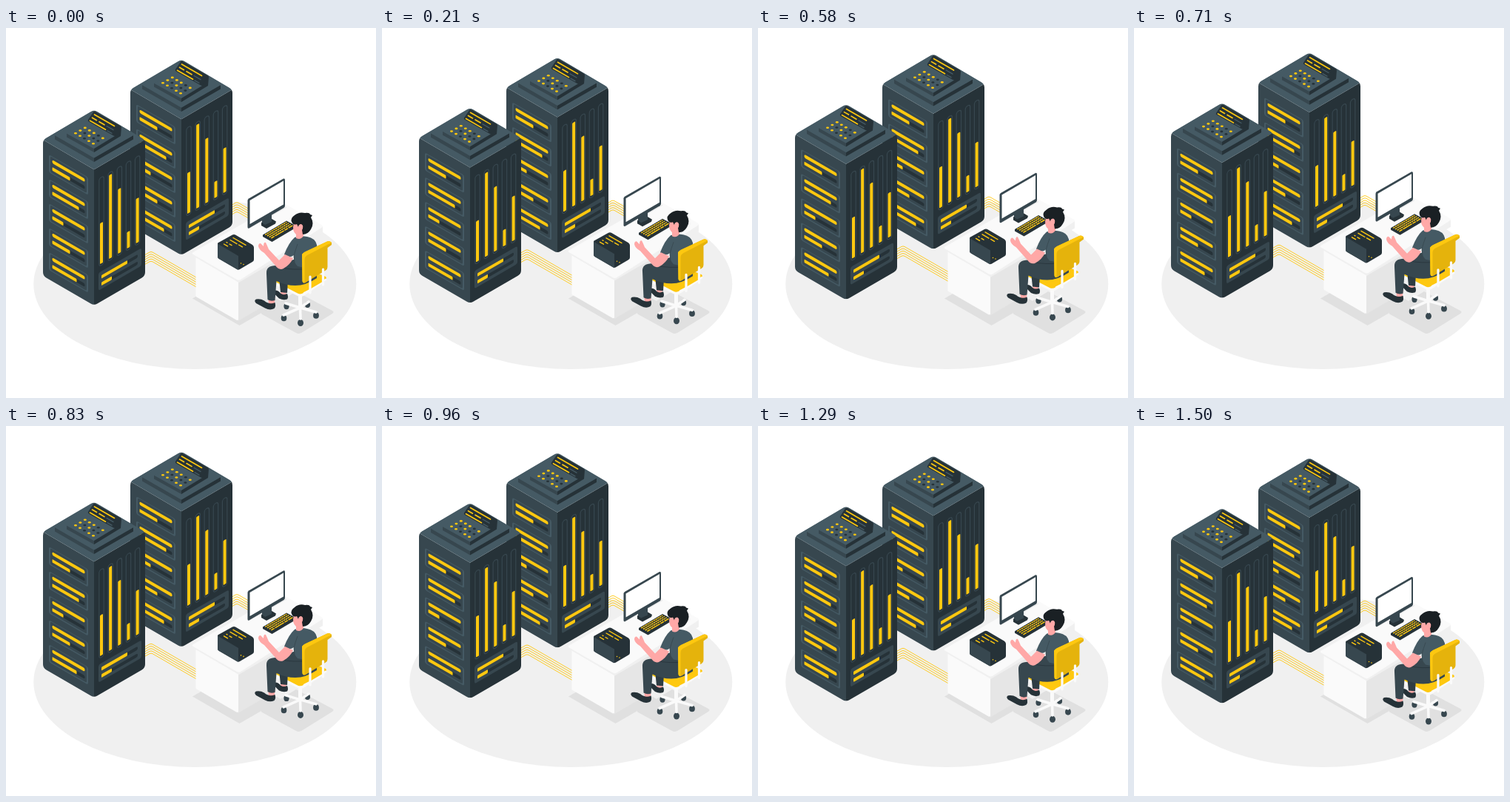
An HTML page for the animation above (1.54 s loop, 500 px wide and 500 px high).

```html
<!DOCTYPE html>
<html lang="en">
<head>
<meta charset="utf-8">
<title>Server room</title>
<style>
  html, body { margin: 0; width: 100%; height: 100%; overflow: hidden; background: #fff; }
  svg { display: block; width: 100%; height: 100%; }
</style>
</head>
<body>
<svg viewBox="0 0 500 500">
  <defs>
    <clipPath id="hull"><path id="hullPath"/></clipPath>
    <g id="tower"></g>
  </defs>

  <ellipse cx="255.3" cy="346" rx="218" ry="115" fill="#f0f0f0"/>
  <g fill="#e0e0e0">
    <path d="M252 365.500L315.500 402L372 369.500L308 333Z"/>
    <path d="M345 384.500Q344 386 347 387.500L392 412Q396 414 400 411.500L441 386Q444 384 441 382L392 356Z"/>
  </g>

  <g id="scene">
    <g id="wires" fill="none" stroke="#fec810" stroke-width=".9"></g>
    <use href="#tower" x="118" y="-68"/>
    <use href="#tower"/>

    <g id="desk">
      <path d="M313.500 342L365 312V366L313.500 396Z" fill="#e6e6e6"/>
      <path d="M256.500 308L314 341V394.500L312 395L257.500 363.500Q256.500 363 256.500 362Z" fill="#fafafa"/>
      <path d="M252 304V307.500L314.500 344L428 278V268Z" fill="#f0f0f0"/>
      <path d="M253 303L369 236Q371.500 235 374 236L427 266.500Q429 268 427 269.500L317 340Q314.500 341.500 312 340L253 306Q250.500 304.500 253 303Z" fill="#fafafa"/>
      <path d="M328 271L379 242" stroke="#e6e6e6" stroke-width="1"/>
    </g>

    <g id="monitor">
      <path d="M345 263L356 256L365 261.500L364 264.500L352 271L345 267Z" fill="#263238"/>
      <path d="M346 257L359 250V262L350 266L346 263Z" fill="#37474f"/>
      <path d="M328 230.500L375 203.500Q377 203 377 205V240Q377 242 375.500 243L328.500 270.500Q326.500 271.500 326.500 269V233Q326.500 231.500 328 230.500Z" fill="#37474f"/>
      <path d="M329.500 233L375 206.500V238.500L329.500 265Z" fill="#fff"/>
    </g>

    <g id="keyboard">
      <path d="M347 279.500L379 260.500L391.500 267V270L359.500 289L347 282Z" fill="#263238"/>
    </g>

    <g id="box">
      <path d="M286 291.500Q286 290 288 289.500L306 279.500Q308 278.500 310 279.500L333 293Q335 294.500 335 296.500V313Q335 315 333 316L316 326Q314 327 312 326L288 312Q286 311 286 309Z" fill="#263238"/>
      <path d="M286 291.500L314 308V327L288 312Q286 311 286 309Z" fill="#37474f"/>
      <g fill="#fec810"><circle cx="317.500" cy="318" r=".8"/><circle cx="321" cy="319.500" r=".8"/></g>
    </g>

    <g id="chairBase">
      <g fill="#37474f">
        <ellipse cx="379" cy="376" rx="3.600" ry="4.200"/>
        <ellipse cx="407.500" cy="374" rx="3.600" ry="4"/>
        <ellipse cx="375.500" cy="392" rx="3.800" ry="4.300"/>
        <ellipse cx="398" cy="398.500" rx="4" ry="4.500"/>
        <ellipse cx="419" cy="388.500" rx="3.900" ry="4.300"/>
      </g>
      <g fill="none" stroke="#fafafa" stroke-width="3.600" stroke-linecap="round" stroke-linejoin="round">
        <path d="M397.500 378L378 372M397.500 378L409 370M397.500 378L375 388M397.500 378L398 393M397.500 378L419 384"/>
        <path d="M397.500 360V378" stroke-width="5"/>
      </g>
      <path d="M362 339.500V344Q362 346 364 347L394 362Q398 364 402 362L428 345V339Z" fill="#fafafa"/>
      <path d="M363 339Q364 336 367 335L398 322L432 336Q434 338 431 341L402 358Q398 360.500 394 358.500L366 344Q362 342 363 339Z" fill="#fec810"/>
    </g>

    <g id="person">
      <g fill="#ffa8a7">
        <path d="M371.500 350L379.500 352L378.500 361L371 360Z"/>
        <path d="M354 362L363.500 363L363 373L355 373Z"/>
      </g>
      <g fill="#263238" transform="translate(0 .5)">
        <path d="M364 354Q368 354 371 358Q375 361 380 358.500Q382 363 380 366Q375 368 369 365L364 360Q362 356 364 354Z"/>
        <path d="M338 366Q344 365 349 368Q356 374 363.500 370.500Q365 376 362.500 378.500Q357 381.500 350 378L338 371.500Q334.500 368 338 366Z"/>
      </g>
      <path d="M369 338L381 341L380 358L371 357Z" fill="#2e3c43"/>
      <path d="M392 312Q377 316 365 321Q351 321 352 332L353.500 367Q358 370 363.500 368L365.500 342Q378 348 391 348Q405 348 420 338V314Z" fill="#37474f"/>
      <path d="M365 321Q375 327 401 326" fill="none" stroke="#263238" stroke-width=".7"/>
      <path d="M390 283Q397 280 407 282Q418 284 420 293L421.500 318Q409 326 394 322Q388 316 389 307Q382 312 376 306Q382 290 390 283Z" fill="#455a64"/>
      <path d="M394 292Q391 300 389 308L390 316" fill="none" stroke="#37474f" stroke-width=".8"/>
      <path d="M377 306L388 311Q384 320 375 325Q369 328 364 321L349 304Q342 300 341 295Q341 291 344 291L348 295Q348 289 351 290Q353 294 355 299L369 314Z" fill="#ffa8a7"/>
      <path d="M389 264Q386 274 392 279L392 284Q398 287 402 281L402 265Z" fill="#ffa8a7"/>
      <path d="M386 262Q384 257 390 253Q396 248 404 250Q410 249 411 252L414 253L412 256Q417 264 412 272Q408 279 401 279L400 273Q403 267 399 265Q396 265 395 269L393 265Q388 267 386 262Z" fill="#1a2024"/>
      <ellipse cx="398" cy="269.500" rx="2.800" ry="4" fill="#ffa8a7"/>
    </g>

    <g id="chairBack">
      <path d="M400 306Q401 304 404 302.500L434 288.500Q437 287 440 290V293L434.500 297V323Q434.500 326 432 327.500L405 344Q401 346 400.500 342Z" fill="#e5b30c"/>
      <path d="M400 306Q401 304 404 302.500L434 288.500Q437 287 440 290L407 307Q403.500 309 403.500 313V344Q401 345 400.500 342Z" fill="#fec810"/>
      <g fill="none" stroke="#fafafa" stroke-width="3.200" stroke-linecap="round">
        <path d="M411 336V358M428.500 326V347"/>
        <path d="M411 354L403 358M428.500 342L432 340" stroke-width="2.500"/>
      </g>
    </g>
  </g>
</svg>
<script>
const NS = 'http://www.w3.org/2000/svg';
const $ = id => document.getElementById(id);
const SLOPE = 0.577;
const INK = '#263238', SLATE = '#37474f', STEEL = '#455a64', GOLD = '#fec810';

function add(parent, tag, attrs) {
  const el = document.createElementNS(NS, tag);
  for (const k in attrs) el.setAttribute(k, attrs[k]);
  return parent.appendChild(el);
}
const poly = (g, points, fill) => add(g, 'polygon', { points, fill });
const bar = (g, x, y, width, height, fill, rx = 0) => add(g, 'rect', { x, y, width, height, fill, rx });
const line = (g, x, y, len, stroke, w) =>
  add(g, 'path', { d: `M${x} ${y}l${len} ${len * SLOPE}`, stroke, 'stroke-width': w, 'stroke-linecap': 'round' });

// Closed path with softened corners.
function softPath(pts, r) {
  const toward = (a, b) => {
    const k = r / Math.hypot(b[0] - a[0], b[1] - a[1]);
    return [a[0] + (b[0] - a[0]) * k, a[1] + (b[1] - a[1]) * k];
  };
  return pts.map((p, i) => {
    const from = toward(p, pts.at(i - 1)), to = toward(p, pts[(i + 1) % pts.length]);
    return `${i ? 'L' : 'M'}${from}Q${p} ${to}`;
  }).join('') + 'Z';
}

function drawBody(g) {
  const body = add(g, 'g', { 'clip-path': 'url(#hull)' });
  poly(body, '50,151 119,191.300 119,376 50,336', SLATE);
  poly(body, '188,151 119,191.300 119,376 188,336', INK);
  poly(body, '119,110 188,151 119,191.300 50,151', STEEL);
}

function drawLeftFace(g) {
  const face = add(g, 'g', { transform: `matrix(1 ${SLOPE} 0 1 50 152)` });
  [24, 36, 15, 24, 33].forEach((len, i) => {
    const y = 14.5 + 33 * i;
    bar(face, 8, y, 53, 24, STEEL, 2.5);
    bar(face, 10, y + 1, 49, 21.5, SLATE, 2);
    bar(face, 12.5, y + 4.5, 44, 4.6, GOLD, 2);
    bar(face, 12.5, y + 14.3, 44, 4.6, INK, 2);
    bar(face, 12.5, y + 14.3, len, 4.6, GOLD, 1);
  });
}

function drawRightFace(g) {
  const face = add(g, 'g', { transform: `matrix(1 ${-SLOPE} 0 1 119 191.8)` });
  [77, 19, 45, 110, 72].forEach((top, i) => {
    const x = 10 + 12.15 * i;
    add(face, 'rect', { x: x - 3.2, y: 15.5, width: 6.4, height: 119, rx: 3, fill: INK, stroke: SLATE, 'stroke-width': 1.2 });
    bar(face, x - 2, top, 4, 132 - top, GOLD, 1);
  });
  bar(face, 6, 142.5, 58, 24, SLATE, 2.5);
  [[148, 35], [157.5, 14]].forEach(([y, len]) => {
    bar(face, 10, y, 49, 4.6, INK, 2);
    bar(face, 10, y, len, 4.6, GOLD, 1);
  });
}

function drawConsole(g) {
  poly(g, '66,145 119,175.500 119,181 66,150.500', SLATE);
  poly(g, '172,145 119,175.500 119,181 172,150.500', INK);
  poly(g, '66,145 119,114.500 172,145 119,175.500', STEEL);

  poly(g, '82,142.500 119,163 119,168 82,147.500', SLATE);
  poly(g, '119,162 146,146 154,131.500 156,134 155,146 119,168', INK);
  poly(g, '82,142.500 111,125 147,146 119,163', STEEL);
  add(g, 'path', { d: softPath([[119, 112], [155, 132.5], [147, 146.5], [110, 125.5]], 2), fill: INK });
  line(g, 119.5, 117, 27, GOLD, 1.7);
  line(g, 116.5, 121.2, 6, GOLD, 1.7);
  line(g, 126, 126.7, 7, GOLD, 1.7);
  line(g, 136, 132.5, 9, STEEL, 1.4);
  line(g, 113.5, 125.2, 21, GOLD, 1.7);
  line(g, 137, 138.8, 6, STEEL, 1.4);

  const lit = '111101011100101';
  for (let i = 0; i < 15; i++) {
    const a = Math.floor(i / 3), b = i % 3;
    add(g, 'ellipse', {
      cx: 94 + 6 * a + 6.4 * b, cy: 142.3 + 3.5 * a - 3.7 * b,
      rx: 2, ry: 1.3, fill: +lit[i] ? GOLD : INK
    });
  }
}

function drawWires(g) {
  for (let k = 0; k < 5; k++) {
    const y = 3.2 * k;
    add(g, 'path', { d: `M186 ${307.500 + y}L194 ${303 + y}q2 -1 4 0l62 35.800` });
    add(g, 'path', { d: `M304 ${240 + y}L310 ${236.300 + y}q2 -1 4 0l20 11.500` });
  }
}

function drawKeys(g) {
  for (let r = 0; r < 4; r++) {
    add(g, 'path', {
      d: `M${350.3 + 2.7 * r} ${279.5 + 1.5 * r}l29 -17.200`, stroke: GOLD,
      'stroke-width': 1.5, 'stroke-dasharray': r === 3 ? '5 1 14 1' : '2.5 .7', fill: 'none'
    });
  }
}

$('hullPath').setAttribute('d', softPath([[119, 110.5], [188, 151], [188, 335], [119, 375], [50, 335], [50, 151]], 5));
[drawBody, drawLeftFace, drawRightFace, drawConsole].forEach(draw => draw($('tower')));
drawWires($('wires'));
drawKeys($('keyboard'));
[[307, 283.5, 17], [303, 286.5, 9], [314.500, 293, 5], [298, 289.5, 1], [302, 292, 3], [294.5, 292, 5]]
  .forEach(([x, y, len]) => line($('box'), x, y, len, GOLD, 1.4));

// Linear bob of 10 px, held at 24 steps per second.
const LOOP = 1540, STEPS = 37, RISE = 10;
const start = performance.now();

function render(now) {
  const t = Math.max(0, now - start) % LOOP;
  const step = Math.min(STEPS - 1, Math.floor((t + 5) * 24 / 1000));
  const phase = ((step + 1) % STEPS) / STEPS;
  const lift = RISE * (1 - Math.abs(1 - 2 * phase));
  $('scene').setAttribute('transform', `translate(0 ${(0.54 - lift).toFixed(3)})`);
  requestAnimationFrame(render);
}
render(start);
</script>
</body>
</html>
```
